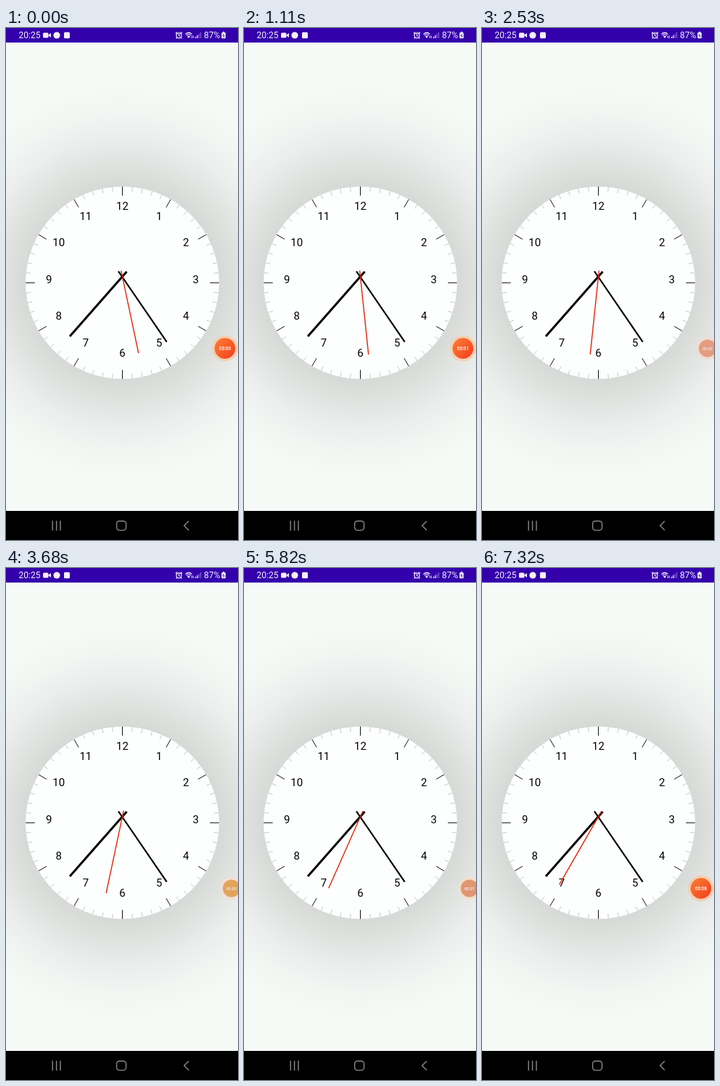
An HTML page that plays this animation: 320 px wide and 704 px high, repeating every 8000 ms.

```html
<!DOCTYPE html>
<html lang="en">
<head>
<meta charset="utf-8">
<title>Analog clock</title>
<style>
  html, body { margin: 0; width: 100%; height: 100%; overflow: hidden; }
  svg { display: block; width: 320px; height: 704px; font-family: Roboto, sans-serif; }
</style>
</head>
<body>
<svg viewBox="0 0 320 704">
  <defs>
    <radialGradient id="shade" gradientUnits="userSpaceOnUse" cx="160.5" cy="350" r="270">
      <stop offset=".48" stop-color="#d6d8d6"/>
      <stop offset=".6" stop-color="#dfe2df"/>
      <stop offset=".74" stop-color="#ebeeec"/>
      <stop offset=".87" stop-color="#f2f6f3"/>
      <stop offset="1" stop-color="#f6faf7"/>
    </radialGradient>
    <linearGradient id="hot" x1="0" y1="0" x2="1" y2="1">
      <stop offset="0" stop-color="#fb8034"/>
      <stop offset="1" stop-color="#f33c1c"/>
    </linearGradient>
  </defs>
  <rect width="320" height="704" fill="url(#shade)"/>
  <ellipse cx="160.5" cy="350.3" rx="133.5" ry="132.3" fill="#fdfffe"/>
  <g id="dial"></g>

  <g stroke="#000">
    <path d="M166.5 335 88 424" stroke-width="3"/>
    <path d="M155 334.5 221.7 431.7" stroke-width="2.2"/>
  </g>
  <path id="second" d="M160.5 333.5V449.5" stroke="#e32408" stroke-width="1.4"/>

  <g id="bubble">
    <circle id="halo" cy="440.5"/>
    <circle id="core" cy="440.5"/>
    <circle id="dot" cy="440.5" r="2.6" fill="#c98012"/>
    <text id="timer" y="443" font-size="6.6" font-weight="500" text-anchor="middle" fill="#fff"></text>
  </g>

  <!-- status bar -->
  <rect width="320" height="20" fill="#3400ac"/>
  <g fill="#f4f0fc">
    <text x="17.5" y="14" font-size="12">20:25</text>
    <text x="273" y="14" font-size="12">87%</text>
    <rect x="51" y="6.5" width="7.5" height="7" rx="1.5"/>
    <path d="M58 10 62 7V13Z"/>
    <circle cx="70" cy="10" r="4.6"/>
    <rect x="80" y="5.7" width="8" height="8.6" rx="1.5"/>
    <rect x="297.3" y="6.3" width="5.6" height="8" rx="1"/>
    <rect x="299" y="5" width="2.2" height="2"/>
    <path d="M252 14 250 11.5Q252 9.8 254 11.5Z"/>
    <path d="M261 14V12H262.3V14ZM263.3 14V10H264.6V14Z"/>
    <path d="M265.6 14V8H266.9V14ZM267.9 14V6H269.2V14Z" opacity=".4"/>
  </g>
  <path d="M300.5 8 299 10.7H301.3L299.8 13" fill="none" stroke="#3400ac" stroke-width=".8"/>
  <g fill="none" stroke="#f4f0fc" stroke-width="1.2">
    <circle cx="238.5" cy="10.3" r="3.5"/>
    <path d="M238.5 8V10.5L240 11.5M234 7.5 236 5.6M243 7.5 241 5.6M235.8 13.2 234.6 14.6M241.2 13.2 242.4 14.6"/>
    <path d="M247.5 8.5Q252 4.5 256.5 8.5M249 10.3Q252 7.7 255 10.3"/>
    <path d="M256.3 14V10.5M258.3 10.5V14" stroke-width=".9"/>
  </g>

  <!-- navigation bar -->
  <rect y="664" width="320" height="40" fill="#000"/>
  <g fill="none" stroke="#8e8884" stroke-width="1.4">
    <path d="M64.2 677.5V691M69.6 677.5V691M75 677.5V691"/>
    <rect x="152.6" y="678" width="13" height="12.6" rx="3.8"/>
    <path d="M252 678 245.7 684.2 252 690.4"/>
  </g>
</svg>
<script>
const LOOP = 8000;
const $ = id => document.getElementById(id);
const set = (id, attrs) => {
  for (const key in attrs) $(id).setAttribute(key, attrs[key]);
};

// Dial: 60 ticks and 12 upright numerals
let dial = '';
for (let i = 0; i < 60; i++) {
  const hour = i % 5 === 0;
  const a = i * Math.PI / 30, sin = Math.sin(a), cos = Math.cos(a);
  const at = r => `${160.5 + r * sin} ${350.3 - (r - 1) * cos}`;
  dial += `<path d="M${at(133.3)} ${at(hour ? 120.8 : 127)}" stroke="${hour ? '#111' : '#c6c9c7'}"/>`;
  if (hour) dial += `<text x="${160.5 + 101.3 * sin}" y="${350.8 - 100.8 * cos}" font-size="15" text-anchor="middle">${i / 5 || 12}</text>`;
}
$('dial').innerHTML = dial;

const handTicks = [770, 1540, 2530, 3680, 4670, 5820, 6790];
const timerTicks = [770, 1540, 2530, 3190, 3680, 4670, 5820, 6990];
const count = (ticks, t) => ticks.filter(tick => tick <= t).length;

// start, centre x, core radius, core fill, halo fill
const awake = ['url(#hot)', '#f3d0b4'];
const dim = ['#e59c80', '#f1dcd5'];
const poses = [
  [0, 302, 14.3, ...awake],
  [1280, 305, 13.6, ...awake],
  [1380, 308, 12.8, ...awake],
  [1540, 311, 12, ...dim],
  [3190, 311, 12, '#e2a45c', '#f1dfd8'],
  [4670, 311, 12, '#e09672', '#f2e0cc'],
  [6420, 314, 12, '#e09672', '#f2e0cc'],
  [6520, 317, 12, '#dfa873', '#eedfdd'],
  [6790, 312, 12.6, ...awake],
  [6890, 306, 13.6, ...awake],
  [6990, 302, 14.3, ...awake]
];

function draw(now) {
  const t = now % LOOP;
  set('second', { transform: `rotate(${(28 + count(handTicks, t)) * 6} 160.5 342) rotate(180 160.5 342)` });
  const [, x, r, core, halo] = poses.findLast(pose => pose[0] <= t);
  const tucked = t >= 6520 && t < 6790;
  set('halo', { cx: x, r: r + 3.6, fill: halo });
  set('core', { cx: x, r, fill: core });
  set('dot', { cx: x - 2.8, opacity: +tucked });
  set('timer', { x, opacity: tucked ? 0 : r > 12 ? 1 : .8, 'font-size': r * .46 });
  $('timer').textContent = '00:0' + count(timerTicks, t);
}

const start = performance.now();
function frame() {
  draw(performance.now() - start);
  requestAnimationFrame(frame);
}
frame();
</script>
</body>
</html>
```
